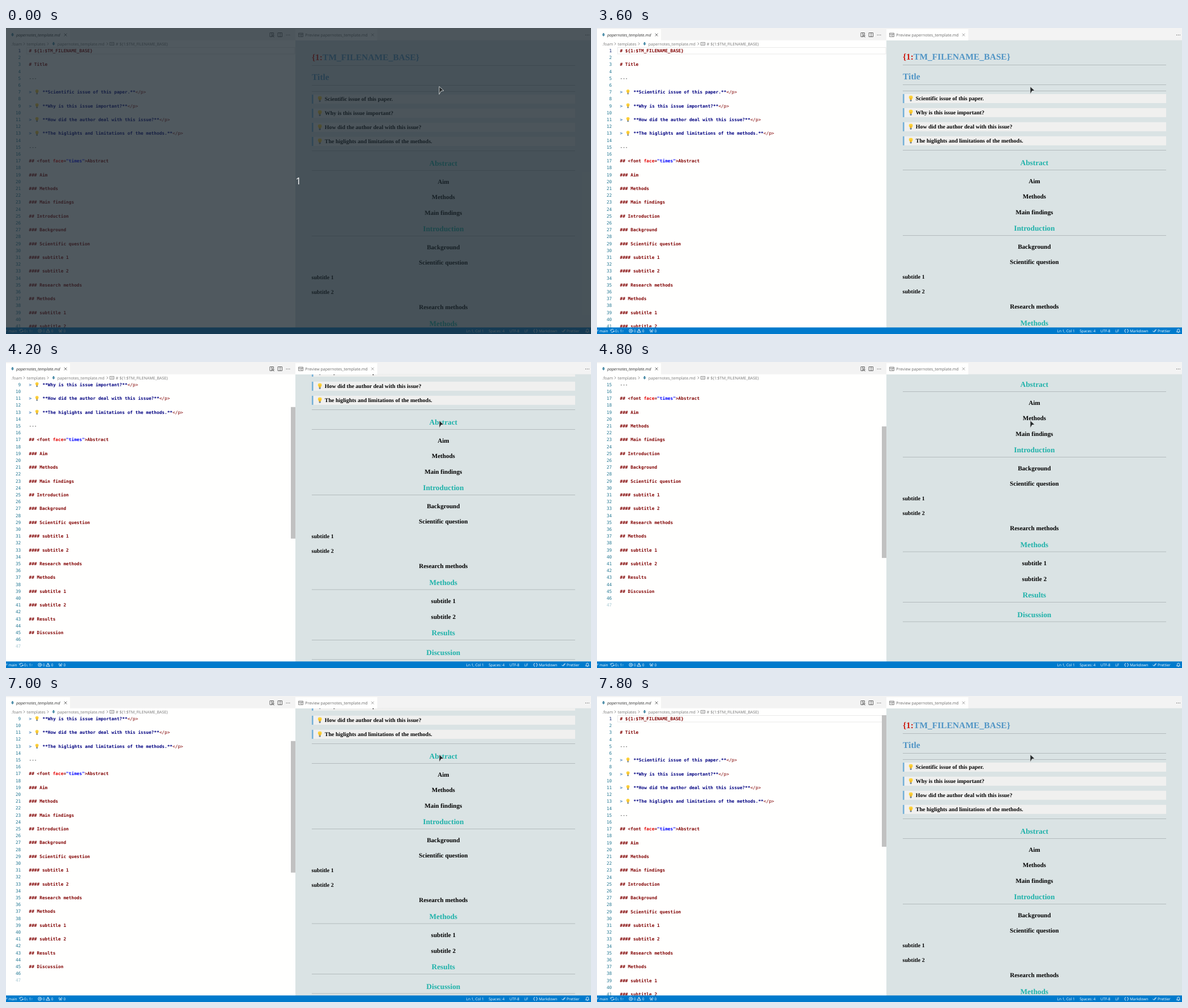
Animation of 1033 by 542 pixels, one loop 8 s. Source, as an HTML page:

```html
<!DOCTYPE html>
<html lang="en">
<head>
<meta charset="utf-8">
<title>Markdown template preview</title>
<style>
html, body { margin: 0; width: 100%; height: 100%; overflow: hidden; background: #fffffe; }
svg { display: block; }
text { white-space: pre; text-rendering: geometricPrecision; }
.ui { font: 7.06px "Open Sans", sans-serif; fill: #767676; }
.status { font: 6.5px "Open Sans", sans-serif; fill: #fff; }
.code { font: 7.79px "DejaVu Sans Mono", monospace; fill: #000; }
.head { font-weight: bold; fill: #800000; }
.bold { font-weight: bold; fill: #000080; }
.mark { fill: #0451a5; }
.tag { fill: #800000; }
.attr { fill: #e50000; }
.str { fill: #0000ff; }
.num { fill: #237893; text-anchor: end; }
.now { fill: #0b216f; }
.end { opacity: .4; }
.h1, .h2, .h3, .h4 { font-family: "Liberation Serif", "Times New Roman", serif; font-weight: bold; }
.h1 { font-size: 15.53px; fill: #5195c5; }
.h2 { font-size: 13.3px; fill: #20b2aa; text-anchor: middle; }
.h3 { font-size: 11.09px; text-anchor: middle; }
.h4 { font-size: 9.98px; }
.red { fill: #cc1a10; }
.line { fill: none; stroke-width: .8; stroke-linecap: round; stroke-linejoin: round; }
</style>
</head>
<body>
<svg id="stage" width="1033" height="542" viewBox="0 0 1033 542">
  <defs>
    <clipPath id="leftClip"><rect y="34" width="511" height="496.5"/></clipPath>
    <clipPath id="rightClip"><rect x="511" y="21.7" width="522" height="508.8"/></clipPath>
    <symbol id="bulb" viewBox="0 0 10 10">
      <path d="M5 0a3.3 3.3 0 0 1 3.3 3.3C8.3 5 6.8 5.6 6.6 7.3H3.4C3.2 5.6 1.7 5 1.7 3.3A3.3 3.3 0 0 1 5 0z" fill="#fdd23c"/>
      <path d="M4 3.6l.6 3.4h.8L6 3.6" fill="none" stroke="#d8921c" stroke-width=".6"/>
      <path d="M3.5 7.3h3v1.7L5.6 10H4.4L3.5 9z" fill="#78868e"/>
    </symbol>
    <symbol id="file" viewBox="0 0 6 7" overflow="visible">
      <path d="M1.8 .4h2.4v2.5h1.6L3 6.4.2 2.9h1.6z" fill="#498ba7"/>
    </symbol>
  </defs>

  <rect width="1033" height="542" fill="#fffffe"/>
  <g clip-path="url(#leftClip)"><g id="editor"></g></g>
  <rect id="bar" x="503" width="8" height="233" fill="#c1c1c1"/>
  <rect x="511" y="21" width="522" height="510" fill="#dae3e4"/>
  <g clip-path="url(#rightClip)"><g id="preview"></g></g>

  <g id="chrome">
    <rect width="1033" height="21.7" fill="#f3f3f3"/>
    <path d="M0 2h113v20H0zM511 2h144.500v20H511z" fill="#fffffe"/>
    <use href="#file" x="8.500" y="8.500" width="6" height="7"/>
    <use href="#file" x="81" y="24.500" width="6" height="7"/>
    <g class="line" stroke="#424242">
      <path d="M103 10l4.200 4.200m0-4.200l-4.200 4.200"/>
      <path d="M469.500 15.500h-3.500v-7h6.500v3M469.500 8.500v7M472 15l1.300 1.300"/><circle cx="471.300" cy="13.700" r="1.500"/>
      <path d="M480.500 8.500h7v7h-7zM484 8.500v7"/>
    </g>
    <path d="M645.200 10l4.200 4.200m0-4.200l-4.200 4.200" class="line" stroke="#8a8a8a"/>
    <g fill="none" stroke="#424242" stroke-width="1.300" stroke-linecap="round" stroke-dasharray="0 2.800">
      <path d="M495.200 12.300h6"/><path d="M1023.600 12.300h6"/>
    </g>
    <path d="M517 9h7.500v6.500H517zM517 11h7.500M518.500 13h2M522 11v4" class="line" stroke="#6a6a6a"/>
    <path d="M31.200 26l1.900 2-1.900 2M73.200 26l1.900 2-1.900 2M178 26l1.900 2-1.900 2M183.700 25.500h7v5h-7zM185.300 28h3.800" class="line" stroke="#767676"/>
    <rect y="530.400" width="1033" height="12" fill="#007acc"/>
    <g class="line" stroke="#fff">
      <path d="M0 537.500l1.500-1.500v-1.500"/>
      <path d="M24.300 535.500a2.900 2.900 0 0 1 5-1M29.700 537a2.900 2.900 0 0 1-5 1M23.300 534.700l1 1.200 1.200-.8M30.700 537.800l-1-1.200-1.200.8"/>
      <circle cx="59.700" cy="536.400" r="3"/><path d="M58.600 535.300l2.200 2.200m0-2.200l-2.200 2.200"/>
      <path d="M74.300 533.400l3.100 5.600h-6.200zM74.300 535.300v1.700"/>
      <path d="M94 533.700q-1.300 1.900 0 3.800M98.200 533.700q1.300 1.900 0 3.800M96.100 535.500l-1.300 3.700M96.100 535.500l1.300 3.700"/>
      <path d="M933.500 533.500q-1.200 0-1.100 1.500t-.9 1.500q1 0 .9 1.400t1.100 1.400M936.500 533.500q1.200 0 1.100 1.500t.9 1.500q-1 0-.9 1.400t-1.100 1.400"/>
      <path d="M981.600 536.700l1.500 1.700 3-4M984.600 538.200l3-4"/>
      <path d="M1023.700 538.200h5.800l-.9-1.300v-1.600a2 2 0 0 0-4 0v1.600zM1026 539.400h1.200"/>
    </g>
  </g>

  <g id="dim">
    <rect width="1033" height="542" fill="rgb(28,40,48)" fill-opacity=".77"/>
    <text x="516.300" y="277.200" text-anchor="middle" font-family="Open Sans, sans-serif" font-size="17" fill="#fff">1</text>
  </g>
  <path d="M764.900 103.600l8 7.400-4.500.6-3.500 5.800z" fill="#24282a" stroke="#eef2f2" stroke-width=".8"/>
</svg>

<script>
const LINE = 12.2, NOTCH = 200 / 3, LOOP = 8000;
const $ = id => document.getElementById(id);
const editor = $('editor'), preview = $('preview'), chrome = $('chrome'), bar = $('bar'), dim = $('dim');

function add(parent, tag, attrs, content = '') {
  const el = document.createElementNS('http://www.w3.org/2000/svg', tag);
  for (const k in attrs) el.setAttribute(k, attrs[k]);
  el.textContent = content;
  parent.append(el);
  return el;
}

// A text is a string or a list of [class, string, x] runs.
function put(parent, cls, x, y, content) {
  if (typeof content === 'string') return add(parent, 'text', { class: cls, x, y }, content);
  const el = add(parent, 'text', { class: cls, x, y });
  for (const [c, s, left] of content) add(el, 'tspan', left ? { class: c, x: left } : { class: c }, s);
}

const bulb = (parent, x, y, size) =>
  add(parent, 'use', { href: '#bulb', x, y, width: size, height: size });

const questions = [
  'Scientific issue of this paper.',
  'Why is this issue important?',
  'How did the author deal with this issue?',
  'The higlights and limitations of the methods.'
];

// Every second editor line holds text.
const source = [
  '# ${1:$TM_FILENAME_BASE}', '# Title', '---', ...questions.map(q => '> ' + q), '---',
  '## Abstract', '### Aim', '### Methods', '### Main findings', '## Introduction',
  '### Background', '### Scientific question', '#### subtitle 1', '#### subtitle 2',
  '### Research methods', '## Methods', '### subtitle 1', '### subtitle 2', '## Results', '## Discussion'
];

function buildEditor() {
  add(editor, 'rect', { x: 36.5, y: 34.5, width: 473.5, height: 11.5, fill: 'none', stroke: '#e9e9e9' });
  for (let n = 1; n <= 47; n++) {
    const y = 42.9 + (n - 1) * LINE;
    put(editor, 'code num' + (n === 1 ? ' now' : n === 47 ? ' end' : ''), 26.3, y, String(n));
    const s = n % 2 ? source[(n - 1) / 2] : '';
    if (!s) continue;
    if (s[0] === '>') {
      put(editor, 'code', 40.5, y, [['mark', '>'], ['bold', `**${s.slice(2)}**`, 64.5], ['tag', '</p>']]);
      bulb(editor, 50.3, y - 7.2, 8.8);
    } else if (n === 17) {
      put(editor, 'code head', 40.5, y,
        [['', '## <font '], ['attr', 'face'], ['', '='], ['str', '"times"'], ['', '>Abstract']]);
    } else {
      put(editor, s[0] === '#' ? 'code head' : 'code', 40.5, y, s);
    }
  }
}

function buildPreview() {
  const rule = y => add(preview, 'rect', { x: 540, y: y - .5, width: 465, height: 1, fill: '#b3bbbd' });
  put(preview, 'h1', 540, 57, [['red', '{1:'], ['', 'TM_FILENAME_BASE}']]);
  put(preview, 'h1', 540, 92, 'Title');
  [66.5, 101.5, 112.5, 217.5].forEach(rule);
  questions.forEach((q, i) => {
    const y = 118 + i * 24.95;
    add(preview, 'rect', { x: 540, y, width: 465, height: 16, fill: '#f0f0ef' });
    add(preview, 'rect', { x: 540, y, width: 2.6, height: 16, fill: '#76b1d8' });
    bulb(preview, 549, y + 2.6, 10.4);
    put(preview, 'h4', 562.8, y + 11.4, q);
  });
  [['Abstract', 240], ['Introduction', 356], ['Methods', 523.6], ['Results', 613], ['Discussion', 647.5]]
    .forEach(([s, y]) => { put(preview, 'h2', 772.3, y + 4.4, s); rule(y + 12.5); });
  [['Aim', 272.6], ['Methods', 299.8], ['Main findings', 327], ['Background', 388.6],
   ['Scientific question', 415.8], ['Research methods', 494.5], ['subtitle 1', 556.8], ['subtitle 2', 584]]
    .forEach(([s, y]) => put(preview, 'h3', 772.3, y + 3.6, s));
  put(preview, 'h4', 539.6, 445.4, 'subtitle 1');
  put(preview, 'h4', 539.6, 471.4, 'subtitle 2');
}

function buildLabels() {
  const file = 'papernotes_template.md';
  const tab = put(chrome, 'ui', 18, 14.8, file);
  tab.style.fontStyle = 'italic';
  tab.style.fill = '#333';
  put(chrome, 'ui', 528.3, 14.8, 'Preview ' + file).style.fill = '#6a6a6a';
  [[9.3, '.foam'], [36.8, 'templates'], [90.8, file], [193.8, source[0]]]
    .forEach(([x, s]) => put(chrome, 'ui', x, 30.7, s));
  [[4.3, 'main'], [32, '0↓ 1↑'], [65, '0'], [79.8, '0'], [101.5, '0'], [812.6, 'Ln 1, Col 1'],
   [852.2, 'Spaces: 4'], [889, 'UTF-8'], [915.2, 'LF'], [941, 'Markdown'], [990, 'Prettier']]
    .forEach(([x, s]) => put(chrome, 'status', x, 538.7, s));
}

// Wheel notches: start, duration, direction.
const notches = [
  [3580, 250, 1], [3985, 200, 1], [4560, 240, 1],
  [6680, 260, -1], [7260, 240, -1], [7560, 240, -1]
];
// Preview tops of editor lines 3, 5, 7 ...
const tops = [80, 112, 118, 143, 168, 193, 217];

const ease = p => p * p * (3 - 2 * p);
const clamp = p => Math.min(1, Math.max(0, p));

function barOpacity(t) {
  if (t < 3800 || (t >= 5900 && t < 6800)) return 0;
  if (t < 5300 || t >= 6800) return 1;
  return 1 - .2 * Math.min(4, (t - 5200) / 100);
}

function draw() {
  const now = (performance.now() - start) % LOOP;
  const t = Math.floor(now / 100) * 100;
  const scroll = Math.round(notches.reduce(
    (sum, [at, dur, dir]) => sum + dir * NOTCH * ease(clamp((t - at) / dur)), 0));
  const left = 2 * LINE * tops.filter(y => y <= scroll + 22).length;
  preview.setAttribute('transform', `translate(0 ${-scroll})`);
  editor.setAttribute('transform', `translate(0 ${-left})`);
  bar.setAttribute('y', 34 + left * .469);
  bar.setAttribute('opacity', barOpacity(t));
  dim.setAttribute('visibility', t < 100 ? 'visible' : 'hidden');
  requestAnimationFrame(draw);
}

buildEditor();
buildPreview();
buildLabels();
const start = performance.now();
draw();
</script>
</body>
</html>
```
